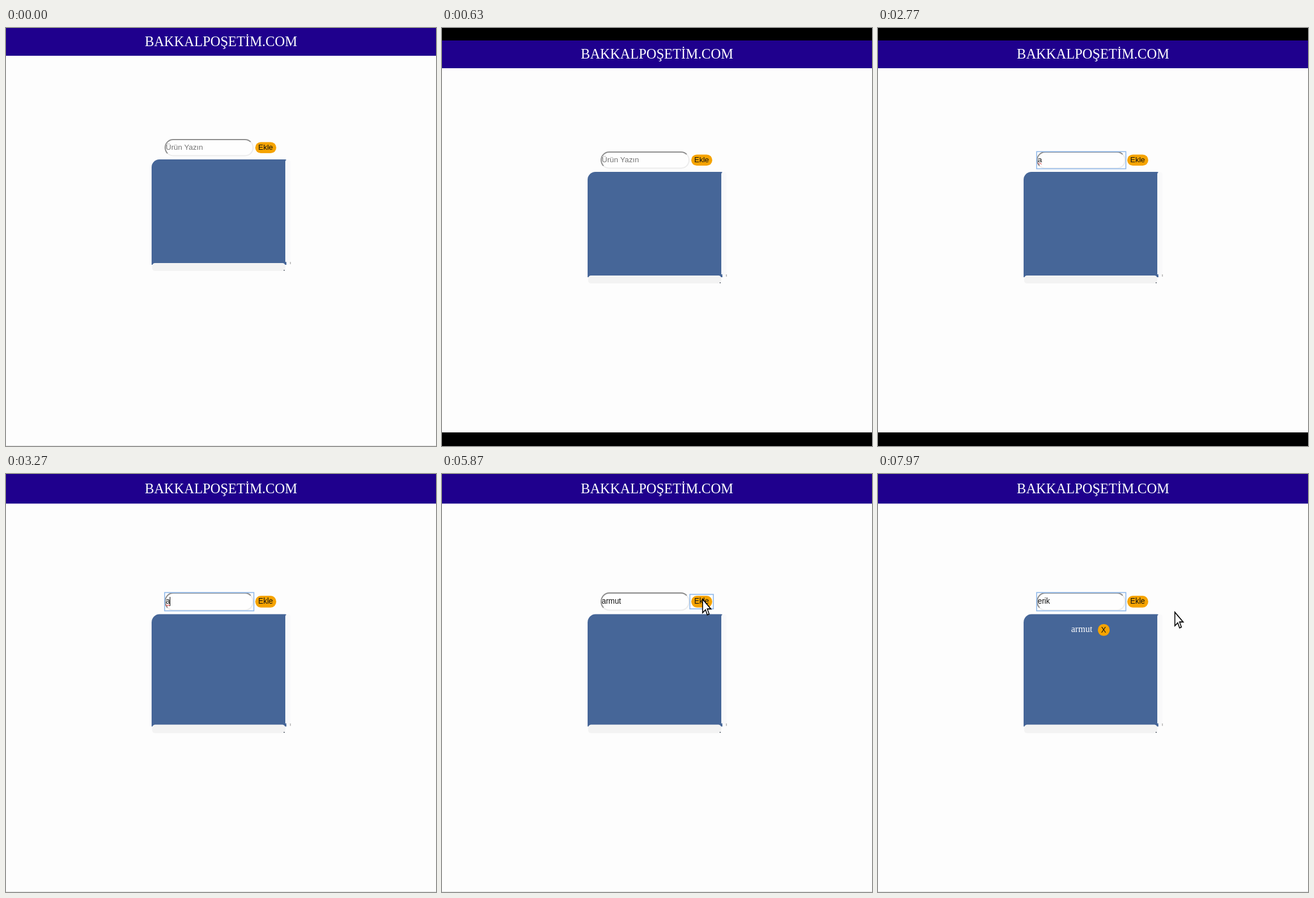
An HTML page with a canvas for the animation above (8 s loop, 759 px wide and 738 px high).

```html
<!DOCTYPE html>
<html lang="tr">
<head>
<meta charset="utf-8">
<style>
html, body { margin: 0; width: 100%; height: 100%; overflow: hidden; background: #fdfdfd; }
canvas { display: block; }
</style>
</head>
<body>
<canvas id="stage" width="759" height="738"></canvas>
<script>
const ctx = document.getElementById('stage').getContext('2d');
const WIDTH = 759, HEIGHT = 738, LOOP = 8000;
const BAR_TOP = 22, VIEW_HEIGHT = 692;
const SANS = '13.333px "Liberation Sans", Arial, sans-serif';
const serif = size => `${size}px "Liberation Serif", "Times New Roman", serif`;

// Each entry overrides the state from its time onwards.
const EVENTS = [
  [0, { text: '', caret: false, focus: '', typo: false, item: false }],
  [830, { focus: 'input', caret: true }],
  [1170, { text: 'a' }],
  [1700, { caret: false }],
  [2370, { caret: true, typo: true }],
  [2770, { caret: false }],
  [3270, { caret: true }],
  [3500, { text: 'ar', typo: false }],
  [3600, { text: 'arm' }],
  [3700, { text: 'armu' }],
  [3870, { text: 'armut' }],
  [4930, { caret: false }],
  [5460, { caret: true }],
  [5870, { focus: 'button', caret: false }],
  [5970, { text: '', item: true }],
  [6470, { focus: 'input', caret: true }],
  [6930, { text: 'e' }],
  [7020, { text: 'er' }],
  [7100, { text: 'eri' }],
  [7270, { text: 'erik' }],
  [7800, { caret: false }]
];

// Pointer path: time, x, y
const POINTER = [
  [5430, 588, 227], [5730, 460, 221], [6340, 460, 221],
  [6600, 138, 236], [7770, 138, 236], [7970, 524, 244]
];

function stateAt(time) {
  return Object.assign({}, ...EVENTS.filter(e => e[0] <= time).map(e => e[1]));
}

function pointerAt(time) {
  if (time < POINTER[0][0]) return null;
  const next = POINTER.findIndex(p => p[0] > time);
  if (next < 0) return POINTER[POINTER.length - 1].slice(1);
  const [t0, x0, y0] = POINTER[next - 1], [t1, x1, y1] = POINTER[next];
  const k = (time - t0) / (t1 - t0);
  return [x0 + (x1 - x0) * k, y0 + (y1 - y0) * k];
}

function rect(x, y, w, h, color) {
  ctx.fillStyle = color;
  ctx.fillRect(x, y, w, h);
}

function rounded(x, y, w, h, radii, color) {
  ctx.fillStyle = color;
  ctx.beginPath();
  ctx.roundRect(x, y, w, h, radii);
  ctx.fill();
}

function label(text, x, y, font, color, align = 'left') {
  ctx.font = font;
  ctx.fillStyle = color;
  ctx.textAlign = align;
  ctx.fillText(text, x, y);
}

function focusRing(x, y, w, h) {
  ctx.strokeStyle = '#8fb8ea';
  ctx.lineWidth = 1.6;
  ctx.strokeRect(x, y, w, h);
}

function insetBorder(x, y, w, h, r) {
  const PI = Math.PI, right = x + w - r, bottom = y + h - r;
  ctx.lineWidth = 2;
  ctx.strokeStyle = '#ececec';
  ctx.beginPath();
  ctx.arc(right, y + r, r, -PI / 4, 0);
  ctx.arc(right, bottom, r, 0, PI / 2);
  ctx.arc(x + r, bottom, r, PI / 2, PI * 0.75);
  ctx.stroke();
  ctx.strokeStyle = '#8d8d8d';
  ctx.beginPath();
  ctx.arc(x + r, bottom, r, PI * 0.75, PI);
  ctx.arc(x + r, y + r, r, PI, PI * 1.5);
  ctx.arc(right, y + r, r, -PI / 2, -PI / 4);
  ctx.stroke();
}

function drawInput(state) {
  rounded(280, 196, 157, 30, 15, '#fefefe');
  insetBorder(281, 197, 155, 28.5, 14);
  if (state.text) label(state.text, 282, 215, SANS, '#111');
  else label('Ürün Yazın', 282, 215, SANS, '#757575');
  ctx.font = SANS;
  const end = 282 + ctx.measureText(state.text).width;
  if (state.typo) {
    ctx.strokeStyle = '#e05050';
    ctx.lineWidth = 1;
    ctx.beginPath();
    for (let x = 282; x <= end; x++) ctx.lineTo(x, 217.5 + (x % 4 < 2 ? 0.8 : -0.8));
    ctx.stroke();
  }
  if (state.caret) rect(Math.round(end), 203.5, 1, 15, '#000');
  if (state.focus === 'input') focusRing(280, 196.3, 157.5, 30.2);
}

function drawPanel(state) {
  rounded(257, 232, 238, 186, [14, 2, 0, 0], '#466698');
  rounded(493, 233, 9, 182, 3, '#f9f9fa');
  rounded(258, 415, 235, 14, 5, '#f3f3f3');
  rect(490, 427, 2, 1.5, '#59616c');
  rect(493, 413, 2, 1.5, '#466698');
  rect(501.5, 413, 1, 4, '#8b8b8b');
  if (state.item) {
    label('armut', 341, 262, serif(16), '#fff');
    rounded(388, 248.5, 21, 19.5, 10, '#f5a300');
    label('X', 398.3, 262.5, SANS, '#111', 'center');
  }
}

function drawPage(state) {
  rect(0, 0, WIDTH, HEIGHT, '#fdfdfd');
  rect(0, 0, WIDTH, 49, '#1f008d');
  label('BAKKALPOŞETİM.COM', 379.5, 32, serif(24.5), '#fff', 'center');
  drawInput(state);
  rounded(440, 201.5, 37, 19.5, 10, '#f5a300');
  label('Ekle', 458.3, 215, SANS, '#111', 'center');
  if (state.focus === 'button') focusRing(437.5, 199.3, 41.5, 24);
  drawPanel(state);
}

function drawPointer([x, y]) {
  ctx.save();
  ctx.translate(x, y);
  ctx.scale(1.28, 1.5);
  ctx.beginPath();
  for (const p of [[0, 0], [0, 16], [4, 12.5], [6.5, 18.5], [9, 17.5], [6.5, 11.5], [11.5, 11.5]]) ctx.lineTo(...p);
  ctx.closePath();
  ctx.fillStyle = '#fff';
  ctx.fill();
  ctx.strokeStyle = '#000';
  ctx.lineWidth = 1.2;
  ctx.stroke();
  ctx.restore();
}

function draw(time) {
  const stretched = time >= 3270;
  const slide = Math.max(0, Math.min(1, Math.floor((time - 70) / 80 + 1) / 8));
  const top = stretched ? 0 : BAR_TOP * slide;
  ctx.setTransform(1, 0, 0, stretched ? HEIGHT / VIEW_HEIGHT : 1, 0, top);
  drawPage(stateAt(time));
  ctx.setTransform(1, 0, 0, 1, 0, 0);
  if (top > 0) {
    const bottom = (HEIGHT - BAR_TOP - VIEW_HEIGHT) * slide;
    rect(0, 0, WIDTH, top, '#000');
    rect(0, HEIGHT - bottom, WIDTH, bottom, '#000');
  } else {
    rect(0, HEIGHT - 1, WIDTH, 1, '#e2e2e2');
  }
  const pointer = pointerAt(time);
  if (pointer) drawPointer(pointer);
}

const start = performance.now();
function frame() {
  draw((performance.now() - start) % LOOP);
  requestAnimationFrame(frame);
}
frame();
</script>
</body>
</html>
```
